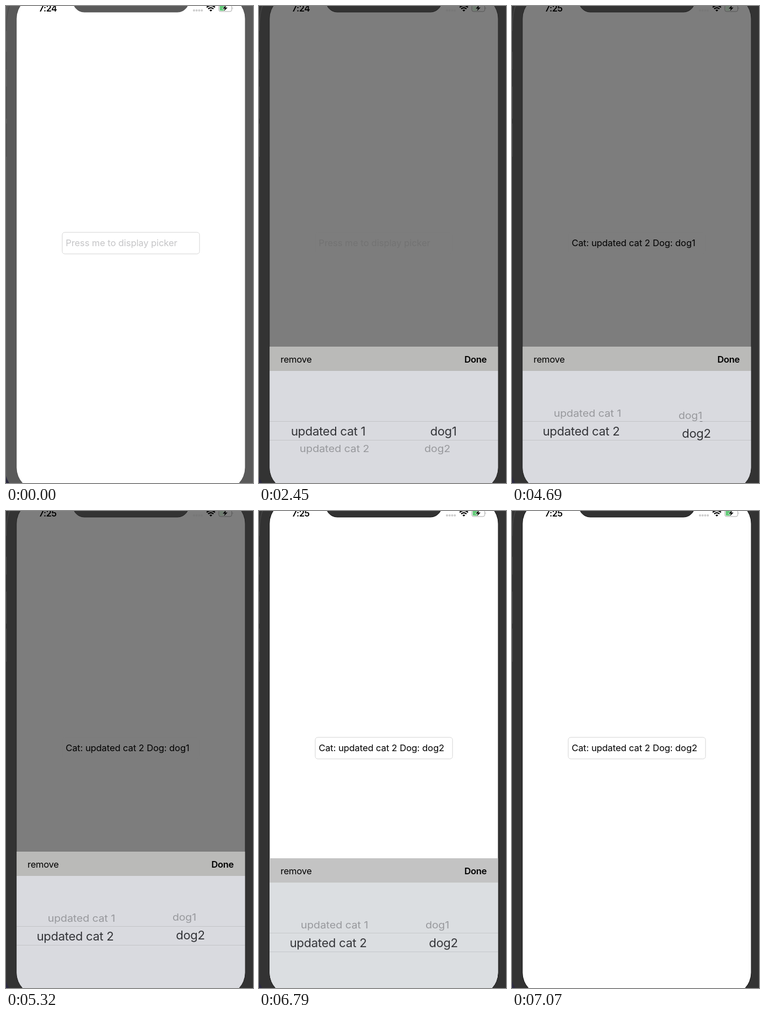
Write an HTML page that moves like this. It is 448 px wide and 864 px high and loops after 8 s.

```html
<!DOCTYPE html>
<html lang="en">
<head>
<meta charset="utf-8">
<title>Picker field</title>
<style>
  html, body { margin: 0; width: 100%; height: 100%; overflow: hidden; background: #333; }
  svg {
    display: block; width: 100vw; height: 100vh;
    font: 16.5px Inter, Roboto, sans-serif; letter-spacing: -.005em;
    animation: scene 8s step-end infinite;
  }
  /* Colour themes: light bezel, dark bezel, dimmed screen, undimmed again */
  @keyframes scene {
    0% { --body: #5a5a5a; --edge: #535353; --button: #4b4b4b; --screen: #fff; --hint: #c5c5c7;
         --border: #d4d4d4; --dots: #cdcdcd; --cell: #a8a8a8; --charge: #62ca78; --halo: #fff;
         --bar: #babab8; --panel: #d9dadf; --rule: #c3c4c8; }
    18.375% { --body: #333; --edge: #111; --button: #474747; --screen: #fff; --hint: #c5c5c7;
         --border: #d4d4d4; --dots: #cdcdcd; --cell: #a8a8a8; --charge: #62ca78; --halo: #fff;
         --bar: #babab8; --panel: #d9dadf; --rule: #c3c4c8; }
    30.625% { --body: #333; --edge: #222; --button: #474747; --screen: #7d7d7d; --hint: #737373;
         --border: #7d7d7d; --dots: #787878; --cell: #555; --charge: #6f7d70; --halo: #858585;
         --bar: #babab8; --panel: #d9dadf; --rule: #c3c4c8; }
    84%, 100% { --body: #333; --edge: #111; --button: #474747; --screen: #fff; --hint: #c5c5c7;
         --border: #d4d4d4; --dots: #cdcdcd; --cell: #a8a8a8; --charge: #62ca78; --halo: #fff;
         --bar: #c3c3c3; --panel: #dbdee1; --rule: #c5c8cb; }
  }

  .body { fill: var(--body); }
  .button { fill: var(--button); }
  .edge { stroke: var(--edge); }
  .screen { fill: var(--screen); }
  .field { fill: none; stroke: var(--border); }
  .dots { fill: var(--dots); }
  .cell { fill: none; stroke: var(--cell); }
  .nub { fill: var(--cell); }
  .charge { fill: var(--charge); }
  .bolt { stroke: var(--halo); stroke-width: 1.2; paint-order: stroke; }
  .bar { fill: var(--bar); }
  .panel { fill: var(--panel); }
  .rules { stroke: var(--rule); }
  .clock { font-size: 16px; font-weight: 600; letter-spacing: -.024em; }
  .done { font-weight: 600; letter-spacing: -.02em; }

  .switch { animation: 8s step-end infinite; }
  .early { animation-name: early; }
  .late { animation-name: late; }
  .hint { fill: var(--hint); animation-name: hint; }
  .first { animation-name: first; }
  .second { animation-name: second; }
  @keyframes early { 0% { opacity: 1 } 35.875%, 100% { opacity: 0 } }
  @keyframes late { 0% { opacity: 0 } 35.875%, 100% { opacity: 1 } }
  @keyframes hint { 0% { opacity: 1 } 49.875%, 100% { opacity: 0 } }
  @keyframes first { 0% { opacity: 0 } 49.875% { opacity: 1 } 70%, 100% { opacity: 0 } }
  @keyframes second { 0% { opacity: 0 } 70%, 100% { opacity: 1 } }

  .picker { animation: slide 8s infinite; }
  @keyframes slide {
    0% { transform: translateY(250px); animation-timing-function: step-end; }
    30.625%, 84% { transform: none; animation-timing-function: cubic-bezier(.62, 0, .4, 1); }
    88.3%, 100% { transform: translateY(250px); }
  }

  /* Wheel rows: large inside the band, smaller and grey outside it */
  .lens, .rim { font-size: 22px; text-anchor: middle; }
  .lens { --row: -34px; letter-spacing: -.014em; fill: #333438; }
  .rim { --row: -32px; fill: #97989c; }
  .cat { animation: cat 8s ease-in-out infinite; }
  .dog { animation: dog 8s ease-in-out infinite; }
  @keyframes cat {
    0%, 37.6% { transform: none; }
    44.5% { transform: translateY(calc(var(--row) * 1.12)); }
    47.25% { transform: translateY(calc(var(--row) * 1.06)); }
    49.6%, 100% { transform: translateY(var(--row)); }
  }
  @keyframes dog {
    0%, 52.5% { transform: none; }
    62% { transform: translateY(calc(var(--row) * 1.2)); }
    66.5% { transform: translateY(calc(var(--row) * 1.07)); }
    70%, 100% { transform: translateY(var(--row)); }
  }
</style>
</head>
<body>
<svg viewBox="0 0 448 864" preserveAspectRatio="none">
  <defs>
    <clipPath id="glass"><rect x="19.3" y="-18.5" width="414.2" height="896" rx="41.5"/></clipPath>
    <clipPath id="band"><rect x="19" y="752" width="416" height="35"/></clipPath>
    <clipPath id="outside"><path d="M19 661h416v91H19zM19 787h416v120H19z"/></clipPath>
  </defs>

  <rect class="body" width="448" height="864"/>
  <path class="button" d="M0 83h1.2v32H0zM0 146h1.2v58H0zM0 213h1.2v60H0z"/>
  <path class="button" d="M7 0Q1 15 1 45L0 45Q0 15 5.5 0z"/>
  <path d="M0 851Q2 859 6 864H0z" fill="#2b2940"/>
  <rect class="edge" x="19.3" y="-18.5" width="414.2" height="896" rx="41.5" stroke-width="1.5"/>

  <g clip-path="url(#glass)">
    <rect class="screen" y="-20" width="448" height="900"/>

    <g class="clock">
      <text class="switch early" x="59.7" y="10">7:24</text>
      <text class="switch late" x="59.7" y="10">7:25</text>
    </g>
    <g class="dots">
      <circle cx="341" cy="8" r="2"/><circle cx="345.7" cy="8" r="2"/>
      <circle cx="350.4" cy="8" r="2"/><circle cx="355.1" cy="8" r="2"/>
    </g>
    <g fill="none" stroke="#000" stroke-width="2.2">
      <path d="M364 2.5Q371.5 -4.5 379 2.5M366.6 5.3Q371.5 .8 376.4 5.3"/>
      <path d="M369 7.4Q371.5 5.4 374 7.4L371.5 10z" fill="#000" stroke="none"/>
    </g>
    <rect class="cell" x="386" y="-2" width="23.5" height="12" rx="3.2"/>
    <path class="nub" d="M410.8 2q1.8 2 0 4z"/>
    <rect class="charge" x="387.6" y="-1" width="9" height="9.6" rx="1.5"/>
    <path class="bolt" d="M399.5 -2L393 4.8H397L395.3 9.5L401.8 2.8H397.8z"/>

    <rect class="field" x="102" y="410" width="249" height="39" rx="4.5"/>
    <text class="switch hint" x="108.2" y="435">Press me to display picker</text>
    <text class="switch first" x="108.2" y="435">Cat: updated cat 2 Dog: dog1</text>
    <text class="switch second" x="108.2" y="435">Cat: updated cat 2 Dog: dog2</text>

    <g class="picker">
      <rect class="panel" x="19" y="617" width="416" height="270"/>
      <rect class="bar" x="19" y="617" width="416" height="44"/>
      <text x="39" y="645.5" letter-spacing="-.25">remove</text>
      <text class="done" x="413" y="645.5" text-anchor="end">Done</text>
      <path class="rules" d="M19 752.5h416M19 786.5h416"/>
      <g class="rim" clip-path="url(#outside)">
        <g class="cat">
          <text transform="translate(137 776) scale(.886 .8)">updated cat 1</text>
          <text transform="translate(137 808) scale(.886 .8)">updated cat 2</text>
        </g>
        <g class="dog">
          <text transform="translate(323.5 776) scale(.886 .8)">dog1</text>
          <text transform="translate(323.5 808) scale(.886 .8)">dog2</text>
        </g>
      </g>
      <g class="lens" clip-path="url(#band)">
        <g class="cat">
          <text x="125.5" y="778">updated cat 1</text>
          <text x="125.5" y="812">updated cat 2</text>
        </g>
        <g class="dog">
          <text x="334.5" y="778">dog1</text>
          <text x="334.5" y="812">dog2</text>
        </g>
      </g>
    </g>
  </g>

  <path class="body edge" d="M121.5 -9.5A20.5 20.5 0 0 0 142 11H311A20.5 20.5 0 0 0 331.5 -9.5z"/>
</svg>
</body>
</html>
```
